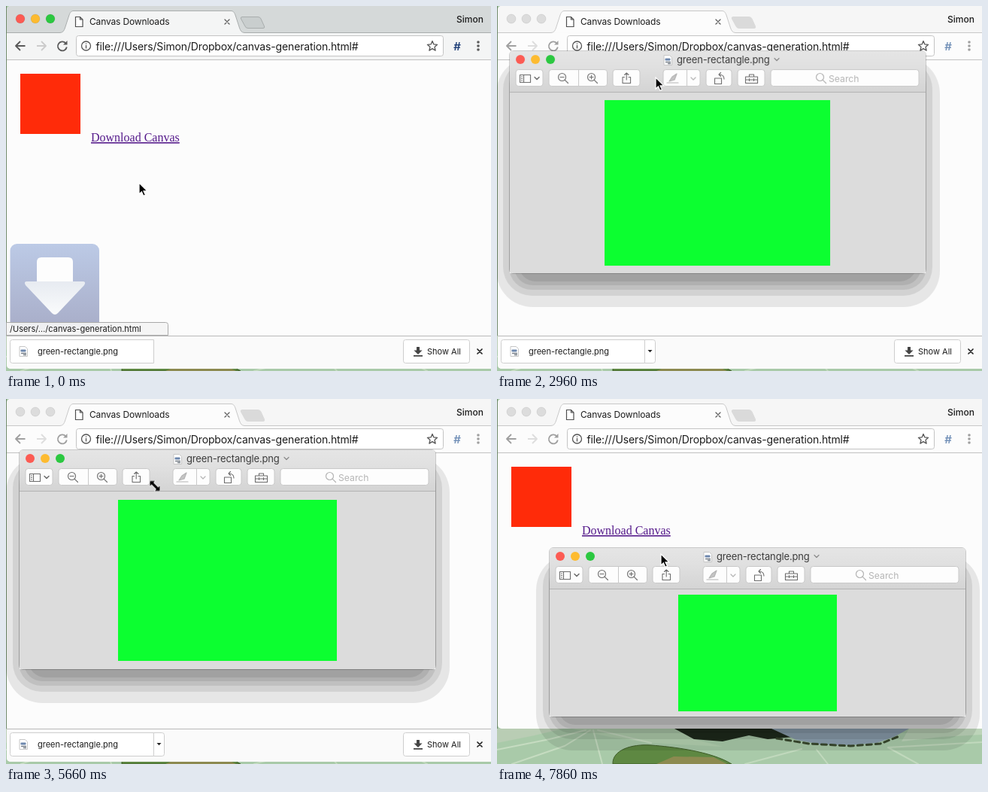
Write an HTML page that moves like this. It is 645 by 485 pixels and loops after 8000 ms.

```html
<!DOCTYPE html>
<html lang="en">
<head>
<meta charset="utf-8">
<title>Canvas Downloads</title>
<style>
@property --h { syntax: "<length>"; inherits: true; initial-value: 295px; }
@property --g { syntax: "<length>"; inherits: true; initial-value: 300px; }
@property --bottom { syntax: "<length>"; inherits: true; initial-value: 482px; }

html, body { margin: 0; width: 100%; height: 100%; overflow: hidden; background: #a8c8aa; }
svg { display: block; }
text { font: 11px Inter, sans-serif; fill: #1c1c1c; white-space: pre; }
.line { fill: none; stroke-linecap: round; stroke-linejoin: round; }
.anim { animation: 8s linear infinite; }
.hard { animation: 8s step-end infinite; }

/* browser window */
#browser {
  --strip: #d5d9d9; --bar: #f4f5f5; --edge: #a9adad; --ink: #5a5a5a; --off: #cccccc;
  --red: #fc5b53; --amber: #fdbb30; --green: #2bc840; --plus: #c9cece; --plusEdge: #a8adad; --hash: #1f3f78;
  animation-name: deactivate;
}
@keyframes deactivate {
  14%, 100% {
    --strip: #f6f6f6; --bar: #fcfcfc; --edge: #c8c8c8; --ink: #a0a0a0; --off: #dedede;
    --red: #dcdcdc; --amber: #dcdcdc; --green: #dcdcdc; --plus: #dadada; --plusEdge: #dadada; --hash: #7391b8;
  }
}
#frame { animation-name: shrink; }
#frameClip { height: var(--bottom); }
@keyframes shrink { 0%, 78.9% { --bottom: 482px; } 82%, 100% { --bottom: 438px; } }
#shelf { animation-name: shelfGone; }
@keyframes shelfGone { 0% { opacity: 1; } 82%, 100% { opacity: 0; } }
#menu { animation-name: menuIn; }
@keyframes menuIn { 0% { opacity: 0; } 4.5%, 100% { opacity: 1; } }
#ring { animation-name: pulse; }
@keyframes pulse { 0%, 11% { opacity: 0; } 13%, 17% { opacity: 1; } 20%, 100% { opacity: 0; } }
#status { animation-name: statusOut; }
@keyframes statusOut { 0%, 1% { opacity: 1; } 4%, 100% { opacity: 0; } }
#drop { animation-name: dropOut; }
@keyframes dropOut {
  0%, .75% { opacity: 1; transform: translateY(0); }
  6.5%, 100% { opacity: 0; transform: translateY(52px); }
}

/* image viewer window */
#viewer { animation-name: drag; }
@keyframes drag {
  0%, 33.4% { transform: translate(0, -27px); }
  37% { transform: translate(17px, 60px); }
  38.1%, 62.1% { transform: translate(18px, 64px); }
  70.75%, 71.87% { transform: translate(18px, 68px); }
  71.88%, 88% { transform: translate(18px, 135px); }
  88.6%, 89.6% { transform: translate(47px, 144px); }
  94%, 95.9% { transform: translate(44px, 174px); }
  98.25%, 100% { transform: translate(70px, 198px); }
}
#size { animation-name: resize; }
@keyframes resize {
  0%, 62.1% { --h: 295px; --g: 300px; }
  70.75%, 71.87% { --h: 291px; --g: 291px; }
  71.88%, 100% { --h: 224px; --g: 211px; }
}
#shadow { animation-name: shadowIn; }
@keyframes shadowIn { 0% { opacity: 0; } 14.6%, 100% { opacity: 1; } }
#content { animation-name: contentIn; }
@keyframes contentIn { 0% { opacity: 0; } 15.85%, 100% { opacity: 1; } }
#shadow rect { height: calc(var(--h) + var(--grow)); }
#below { y: var(--h); }
#body { height: var(--h); }
#picture {
  width: var(--g); height: calc(var(--g) * .7333);
  x: calc(276.4px - var(--g) / 2); y: calc(27.5px + var(--h) / 2 - var(--g) * .3667);
}
.btn { fill: #fdfdfd; stroke: #c9c9c9; }
.icon { stroke: #6c6c6c; }
.faint { stroke: #b4b4b4; }

/* pointers */
#arrow { animation-name: point; }
@keyframes point {
  0%, .75% { transform: translate(177px, 235px); }
  8% { transform: translate(125px, 440px); }
  10.5%, 11.1% { transform: translate(112px, 451px); }
  13%, 18.9% { transform: translate(107px, 451px); }
  22.3% { transform: translate(238px, 97px); }
  24.5% { transform: translate(198px, 25px); }
  26.6% { transform: translate(177px, 12px); }
  28.9%, 33.4% { transform: translate(193px, 9px); }
  37% { transform: translate(211px, 95px); }
  38.1%, 40.75% { transform: translate(212px, 99px); }
  46.9%, 49.1% { transform: translate(45px, 94px); }
  55%, 72.9% { transform: translate(20px, 66px); }
  73% { transform: translate(183px, 187px); }
  76.6%, 78.9% { transform: translate(181px, 175px); }
  83.5% { transform: translate(167px, 154px); }
  86%, 88% { transform: translate(166px, 144px); }
  88.6%, 89.6% { transform: translate(195px, 153px); }
  94%, 95.9% { transform: translate(192px, 183px); }
  98.25%, 100% { transform: translate(218px, 206px); }
}
#arrow path { animation-name: arrowShown; }
@keyframes arrowShown {
  0% { opacity: 1; } 22.35% { opacity: 0; } 24.5% { opacity: 1; }
  55% { opacity: 0; } 73%, 100% { opacity: 1; }
}
#sizer { animation-name: pull; }
@keyframes pull {
  0%, 55% { transform: translate(24px, 69px); }
  59.1%, 62.1% { transform: translate(22.5px, 66.5px); }
  70.75%, 71.87% { transform: translate(198px, 115.5px); }
  71.88%, 100% { transform: translate(188px, 192px); }
}
#sizer path { animation-name: sizerShown; }
@keyframes sizerShown { 0% { opacity: 0; } 55% { opacity: 1; } 73%, 100% { opacity: 0; } }
</style>
</head>
<body>
<svg width="645" height="485" viewBox="0 0 645 485">
  <defs>
    <linearGradient id="tile" x2="0" y2="1"><stop stop-color="#bccae6"/><stop offset="1" stop-color="#a8adc8"/></linearGradient>
    <linearGradient id="head" x2="0" y2="1"><stop stop-color="#e7ebf1"/><stop offset="1" stop-color="#fafbfc"/></linearGradient>
    <linearGradient id="chrome" x2="0" y2="1"><stop stop-color="#e5e5e5"/><stop offset=".4" stop-color="#e0e0e0"/><stop offset="1" stop-color="#d4d4d4"/></linearGradient>
    <g id="file">
      <path d="M-5-6.500H2.500L5.500-3.500V6.500H-5Z" fill="#fff" stroke="#c6c6c6"/>
      <rect x="-3.500" y="-2.500" width="7" height="3" rx="1" fill="#6d87ad"/>
      <path d="M-3 2.500H4M0 4.500H4" stroke="#777f88" stroke-width="1.300"/>
    </g>
    <g id="lens" class="line"><circle cx="-1.500" cy="-1.500" r="5"/><path d="M2.300 2.300L6.500 6.500"/></g>
    <path id="chevron" class="line" d="M-3-1.500L0 1.500 3-1.500"/>
    <path id="cross" class="line" d="M-3-3L3 3M3-3L-3 3"/>
  </defs>

  <!-- pond wallpaper -->
  <rect width="645" height="485" fill="#a9caa9"/>
  <rect width="1" height="438" fill="#718b6c"/>
  <path d="M0 438H88L50 447 0 457Z" fill="#b9cdb4"/>
  <path d="M100 438H238L262 452 300 462 205 457 150 449Z" fill="#b4d2b1"/>
  <path class="line" d="M0 466L70 452 118 440M20 485L90 461 124 440M128 440L140 485M134 440L205 457" stroke="#c6dcc1" stroke-width="2"/>
  <path d="M236 438H372L395 449 360 452 335 447 300 455 262 452Z" fill="#1f2a1c"/>
  <path d="M365 438H548L528 449 505 457 470 460 430 459 398 453Z" fill="#8b9fae"/>
  <path class="line" d="M372 451L415 458 470 461 510 458 535 448" stroke="#39492f" stroke-width="3" stroke-dasharray="7 5"/>
  <path d="M548 438H645V446L590 449 538 455Z" fill="#bdd4b9"/>
  <path class="line" d="M330 485L405 465M440 485L425 466M560 485L520 463 645 456" stroke="#c1d9bd" stroke-width="2"/>
  <path d="M154 485C153 467 178 458 205 460S285 468 312 485Z" fill="#5e8842" stroke="#3e5c28"/>
  <path d="M212 485L235 475 288 476 306 485Z" fill="#8c8a50"/>

  <g id="browser" class="hard">
  <g id="frame" class="anim">
    <clipPath id="frameBox"><rect id="frameClip" x="1" y="0" width="660" rx="5"/></clipPath>
    <g clip-path="url(#frameBox)">
      <rect width="645" height="485" fill="#fcfcfc"/>
      <rect width="645" height="36" style="fill:var(--strip)"/>
      <rect y="35" width="645" height="37" style="fill:var(--bar)"/>
      <path d="M0 35.500H72C76 35 77 33 78.500 29L84 12C85.500 8 87 6.500 90 6.500H299C302 6.500 303.500 8 305 12L310.500 29C312 33 313 35 317 35.500H645" style="fill:var(--bar);stroke:var(--edge)"/>
      <path d="M314 14.500H335Q338 14.500 339 17L343.500 27Q344.500 29.500 342 29.500H322Q319 29.500 318 27L312.500 17Q311.500 14.500 314 14.500Z" style="fill:var(--plus);stroke:var(--plusEdge)"/>
      <g stroke="#000" stroke-opacity=".08">
        <circle cx="19" cy="17" r="6" style="fill:var(--red)"/>
        <circle cx="39" cy="17" r="6" style="fill:var(--amber)"/>
        <circle cx="59" cy="17" r="6" style="fill:var(--green)"/>
      </g>
      <path d="M92.500 14.500H98.500L102 18V27.500H92.500ZM98.500 14.500V18H102" fill="#fff" stroke="#4e4e4e" stroke-width="1.200"/>
      <text x="111" y="25" style="font-size:12px;letter-spacing:-.15px">Canvas Downloads</text>
      <use href="#cross" x="294" y="21" stroke="#5f5f5f" stroke-width="1.300"/>
      <text x="599" y="22" style="font-size:12px;font-weight:500">Simon</text>

      <rect x="93.500" y="39.500" width="488" height="27" rx="3" fill="#fff" stroke="#c4c4c4"/>
      <g class="line" stroke-width="1.800" style="stroke-linecap:butt">
        <path d="M25.500 53H14M19 47L13 53 19 59" style="stroke:var(--ink)"/>
        <path d="M41 53H52.500M47 47L53 53 47 59" style="stroke:var(--off)"/>
        <path d="M79.300 49.300A6 6 0 1 0 80.800 54.500" style="stroke:var(--ink)"/>
        <path d="M81.500 46V51.500H76Z" style="fill:var(--ink)"/>
      </g>
      <g class="line" stroke="#555" stroke-width="1.300">
        <circle cx="106.500" cy="53" r="6"/><path d="M106.500 52.500V56M106.500 50V50.200"/>
        <path d="M567 46.500L568.900 50.900 573.600 51.300 570 54.400 571.100 59.100 567 56.600 562.900 59.100 564 54.400 560.400 51.300 565.100 50.900Z"/>
      </g>
      <text x="119.500" y="58.500" style="font-size:14px;letter-spacing:-.15px">file:///Users/Simon/Dropbox/canvas-generation.html#</text>
      <text x="595" y="58.500" style="font-size:15px;font-weight:600;font-style:italic;fill:var(--hash)">#</text>
      <g style="fill:var(--ink)"><circle cx="628" cy="48" r="1.800"/><circle cx="628" cy="53" r="1.800"/><circle cx="628" cy="58" r="1.800"/></g>
      <path d="M0 71.500H645" stroke="#c2c2c2"/>

      <rect x="19" y="90" width="80" height="80" fill="#ff2b09"/>
      <text x="113" y="180" style="font:16px 'Liberation Serif',serif;fill:#551a8b;text-decoration:underline">Download Canvas</text>

      <g id="shelf" class="hard">
        <rect y="438" width="645" height="47" fill="#fafafa"/>
        <path d="M0 438.500H645" stroke="#b9b9b9"/>
        <path d="M196.500 443.500H8.500Q5.500 443.500 5.500 446.500V471.500Q5.500 474.500 8.500 474.500H196.500Z" fill="#fff" stroke="#cecece"/>
        <g id="menu" class="hard">
          <path d="M196.500 443.500H207.500Q210.500 443.500 210.500 446.500V471.500Q210.500 474.500 207.500 474.500H196.500Z" fill="#fff" stroke="#cecece"/>
          <path d="M200.500 457H206.500L203.500 460.200Z" fill="#222"/>
        </g>
        <circle id="ring" class="anim" cx="23" cy="459.500" r="12.500" fill="#cfe0f5" stroke="#7fabde" stroke-width="1.500"/>
        <use href="#file" x="23" y="459"/>
        <text x="42" y="463">green-rectangle.png</text>
        <rect x="528.500" y="443.500" width="88" height="31" rx="3" fill="#fff" stroke="#cecece"/>
        <path d="M546 453H550V457.500H553.500L548 463 542.500 457.500H546ZM542 464H554V465.700H542Z" fill="#454545"/>
        <text x="560" y="463">Show All</text>
        <use href="#cross" x="630" y="459" stroke="#222" stroke-width="1.700"/>
      </g>
    </g>
  </g>
  </g>

  <g id="drop" class="anim">
    <rect x="5.500" y="316" width="118.500" height="114" rx="9" fill="url(#tile)"/>
    <path d="M41 368V340Q41 334 47 334H83Q89 334 89 340V368Z" fill="#fdfdfd"/>
    <path d="M28 366H102Q107 366 104 371L69 408Q65 412 61 408L26 371Q23 366 28 366Z" fill="url(#head)"/>
  </g>
  <g id="status" class="anim">
    <path d="M.500 437.500V420.500H212.500Q215.500 420.500 215.500 423.500V437.500Z" fill="#f5f5f5" fill-opacity=".92" stroke="#a9a9a9"/>
    <text x="5" y="433">/Users/…/canvas-generation.html</text>
  </g>

  <g id="viewer" class="anim">
  <g id="size" class="anim">
    <clipPath id="outside">
      <rect x="-60" y="-60" width="60" height="460"/>
      <rect x="553" y="-60" width="60" height="460"/>
      <rect id="below" x="-60" width="680" height="100"/>
    </clipPath>
    <g id="shadow" class="hard">
      <g clip-path="url(#outside)" fill-opacity=".085">
        <rect x="-18" y="8" width="590" rx="48" style="--grow:37px"/>
        <rect x="-9" y="12" width="571" rx="38" style="--grow:18px"/>
        <rect x="-1" y="16" width="555" rx="30" style="--grow:6px"/>
        <rect x="6" y="20" width="541" rx="24" style="--grow:-4px"/>
        <rect x="12" y="24" width="529" rx="22" style="--grow:-13px"/>
      </g>
      <rect x="-.500" y="-.500" width="554" rx="5.500" fill="none" stroke="#000" stroke-opacity=".2" style="--grow:1px"/>
    </g>
    <g id="content" class="hard">
      <rect id="body" width="553" rx="5" fill="#dcdcdc"/>
      <path d="M0 54V5Q0 0 5 0H548Q553 0 553 5V54Z" fill="url(#chrome)"/>
      <path d="M0 54.500H553" stroke="#b3b3b3"/>
      <circle cx="14" cy="11" r="6" fill="#fc5b53"/><circle cx="34" cy="11" r="6" fill="#fdbb30"/><circle cx="54" cy="11" r="6" fill="#2bc840"/>
      <use href="#file" x="210" y="12"/>
      <text x="222" y="16" style="font-size:13px;letter-spacing:-.15px;fill:#3c3c3c">green-rectangle.png</text>
      <use href="#chevron" x="355" y="11" stroke="#8a8a8a" stroke-width="1.200"/>
      <g class="btn">
        <rect x="8" y="24.500" width="36" height="22" rx="3.500"/>
        <rect x="52" y="24.500" width="77.500" height="22" rx="3.500"/>
        <rect x="137" y="24.500" width="36" height="22" rx="3.500"/>
        <rect x="204" y="24.500" width="49" height="22" rx="3.500"/>
        <rect x="261" y="24.500" width="34" height="22" rx="3.500"/>
        <rect x="303" y="24.500" width="36" height="22" rx="3.500"/>
        <rect x="347" y="24.500" width="197" height="22" rx="3.500"/>
        <path d="M91.500 25V46M235.500 25V46"/>
      </g>
      <g class="line icon" stroke-width="1.100">
        <path d="M13.500 31.500H27.500V41.500H13.500ZM18.500 31.500V41.500M15.500 34H16.500M15.500 36.500H16.500M15.500 39H16.500"/>
        <use href="#chevron" x="36" y="36" stroke-width="1.500"/>
        <use href="#lens" x="71" y="36"/><path d="M67 34.500H72"/>
        <use href="#lens" x="110" y="36"/><path d="M106 34.500H111M108.500 32V37"/>
        <path d="M152.500 34.500H150V42.500H160.500V34.500H158M155.200 38V29M152.500 31.500L155.200 28.800 158 31.500"/>
        <path d="M272.500 36H281.500V43.500H272.500ZM285 37Q285 31 278 31M280.500 28.500L278 31 280.500 33.500"/>
        <path d="M313.500 34H329.500V42.500H313.500ZM318.500 34V31H324.500V34M313.500 38H329.500M318.500 36.500V39.500M324.500 36.500V39.500"/>
      </g>
      <g class="line faint" stroke-width="1.200">
        <path d="M209 42H224"/><path d="M212 40L216 34 222 30 219 38Z" fill="#c4c4c4"/>
        <use href="#chevron" x="244" y="36.500"/>
        <use href="#lens" x="414" y="36"/>
      </g>
      <text x="424" y="41" style="font-size:12.200px;fill:#b5b5b5">Search</text>
      <rect id="picture" fill="#0cff30" shape-rendering="crispEdges"/>
    </g>
  </g>
  </g>

  <g id="arrow" class="anim">
    <path class="hard" d="M0 0V15L3.400 11.800 5.800 17.200 8.400 16.100 6 10.900H10.800Z" stroke="#fff" stroke-width="1.200"/>
  </g>
  <g id="sizer" class="anim">
    <path class="hard" d="M-6.500-6.500H0L-2-4.300 4.300 2 6.500 0V6.500H0L2 4.300-4.300-2-6.500 0Z" stroke="#fff" stroke-width="1.200" paint-order="stroke"/>
  </g>
</svg>
</body>
</html>
```
